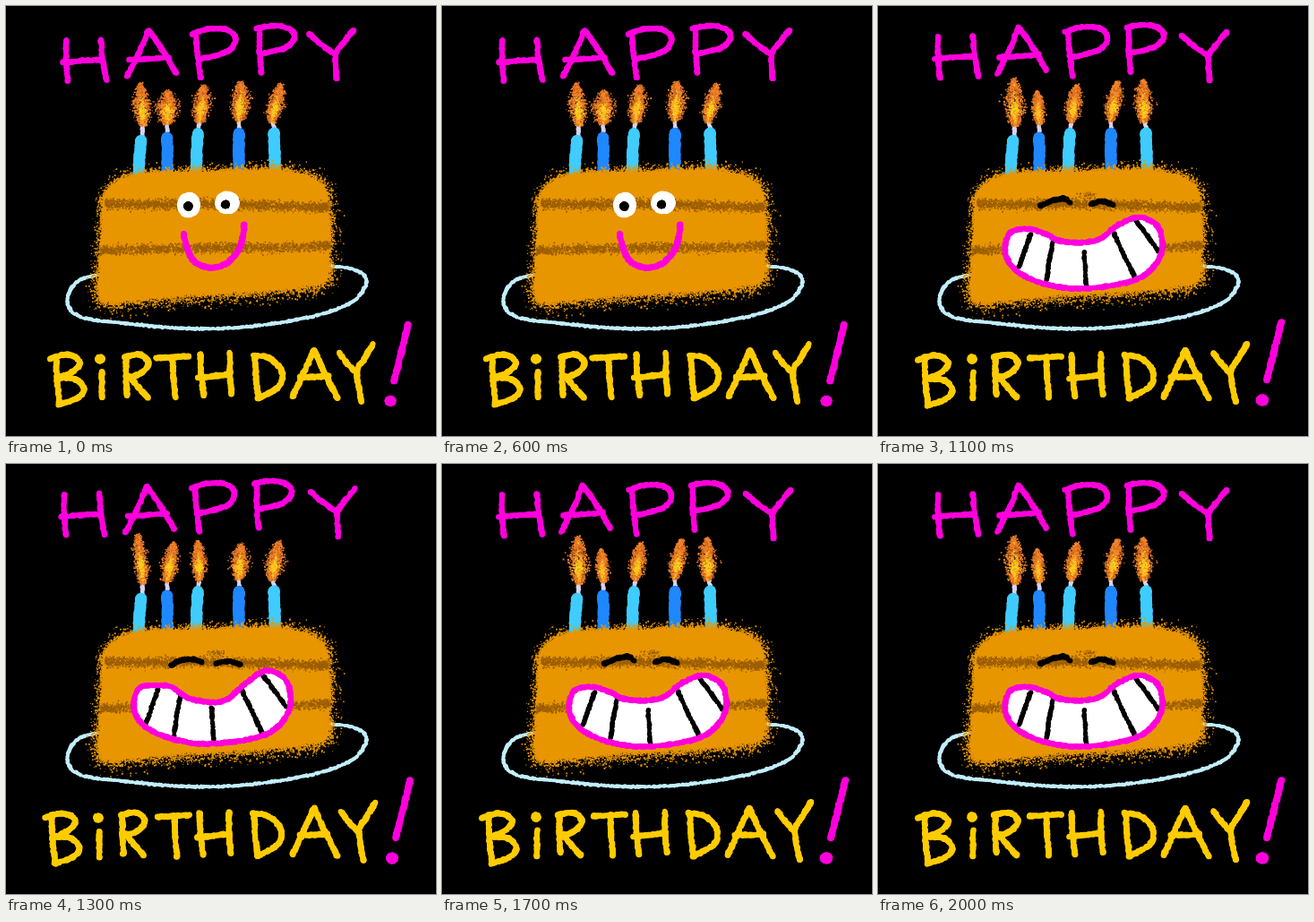
An HTML page with a canvas that plays this animation: 480x480 px, repeating every 2100 ms.

```html
<!DOCTYPE html>
<html lang="en">
<head>
<meta charset="utf-8">
<title>Happy Birthday</title>
<style>
html, body { margin: 0; width: 100%; height: 100%; overflow: hidden; background: #000; }
canvas { display: block; width: 480px; height: 480px; }
</style>
</head>
<body>
<canvas id="stage" width="480" height="480" role="img" aria-label="HAPPY BiRTHDAY!"></canvas>
<script>
const PINK = '#ff00dc', YELLOW = '#ffcc00', CAKE = '#e89600', BROWN = '#9c5e00';
const SKY = '#40ccff', BLUE = '#2088ff', WICK = '#d6d2f0', PLATE = '#c2eeff';
const STEP = 100, FRAMES = 21, LAUGH_START = 9;

// Each letter: strokes split by "|", then its shift in the second and third pose.
const happy = [
  ['67 38 67 60 69 84|106 37 108 60 112 83|63 63 85 61 107 60', -2, -4, 0, -4],
  ['159 27 149 51 135 79|159 27 174 48 190 75|138 60 160 59 182 57', -2, -2, -2, -3],
  ['212 31 214 55 217 80|208 31 225 26 245 26 256 35 251 48 235 55 216 59', -1, -4, 0, -2],
  ['283 26 283 50 285 75|280 25 300 22 317 26 322 36 311 47 287 53', -3, -3, -3, -1],
  ['338 31 352 43 368 54|388 27 375 43 368 55 369 81', 2, 0, 1, 2]
];
const birthday = [
  ['56 391 57 418 60 445|49 394 65 389 78 392 82 400 73 409 59 415|59 415 78 417 87 428 79 438 59 445', -5, 1, -4, 1],
  ['105 393 106 394|107 408 107 437', -3, 2, -1, 1],
  ['134 391 134 412 135 435|132 392 149 389 159 398 152 409 137 415|138 413 148 426 158 437', -4, 0, -3, 0],
  ['167 393 185 392 203 391|186 394 187 415 189 437', 2, 1, 2, 0],
  ['217 388 218 412 221 435|214 415 232 413 250 411|250 387 250 410 252 433', -1, 2, -1, 1],
  ['278 391 279 414 282 438|276 390 294 393 308 408 304 425 281 438', -1, 0, -1, 0],
  ['344 384 332 410 320 436|344 384 356 410 370 438|328 414 344 414 360 413', 0, 0, -1, 0],
  ['372 387 381 399 391 409|410 377 400 394 392 409 397 442', 2, 1, 2, 0]
];
const bang = ['449 355 441 388 433 419|429 440 429 442', 2, -2, 1, -2];

const candles = [
  [SKY, '151 150 149 168 148 188', '153 129 152 144'],
  [BLUE, '180 146 180 165 180 186', '180 127 180 140'],
  [SKY, '214 142 213 165 212 186', '216 125 215 136'],
  [BLUE, '260 142 260 165 260 186', '260 124 260 136'],
  [SKY, '299 142 300 165 300 184', '297 125 299 136']
];
// Tip x, tip y, half width per pose.
const flames = [
  [[150, 87, 10], [181, 95, 12], [221, 89, 10], [263, 85, 10], [306, 88, 9]],
  [[147, 79, 8], [187, 88, 9], [214, 87, 8], [262, 90, 10], [304, 87, 10]],
  [[152, 82, 11], [178, 96, 7], [222, 89, 9], [267, 85, 9], [296, 83, 10]]
];

const cakeEdge = '108 326 107 290 109 250 111 215 125 198 150 190 210 187 260 186 300 185 338 192 355 207 359 240 358 280 356 305 330 312 290 316 250 319 190 322 140 327';
const plate = '105 300 84 305 71 319 70 336 86 348 130 354 200 360 270 358 340 347 384 332 400 315 401 302 388 294 361 290';
const mouthTop = [
  '143 262 150 247 170 243 190 251 208 264 230 268 249 261 266 244 288 231 306 234',
  '143 264 150 249 168 247 185 249 203 261 230 266 248 262 266 246 289 231 307 236',
  '142 268 149 252 168 249 186 254 203 262 226 264 248 260 266 246 288 236 305 240'
];
const mouthBottom = '316 247 318 268 309 287 290 301 255 309 215 311 180 304 156 292 145 278';
const teeth = '169 251 163 268 156 288|194 259 190 280 187 303|229 271 230 288 231 307|262 250 274 275 285 298|287 236 300 253 312 270';
const lids = [
  '186 225 197 220 210 218 218 222|237 222 247 220 259 224',
  '184 225 195 219 210 218 218 221|235 223 247 220 262 224',
  '181 223 193 218 207 215 214 220|238 221 250 218 263 222'
];

let seed = 1, g;
function rnd() {
  seed = seed + 0x6D2B79F5 | 0;
  let t = Math.imul(seed ^ seed >>> 15, 1 | seed);
  t = t + Math.imul(t ^ t >>> 7, 61 | t) ^ t;
  return ((t ^ t >>> 14) >>> 0) / 4294967296;
}
const spread = s => (rnd() * 2 - 1) * s;
const gauss = s => (rnd() + rnd() + rnd() + rnd() - 2) * 1.73 * s;

function layer(paint) {
  const c = document.createElement('canvas');
  c.width = c.height = 480;
  g = c.getContext('2d');
  paint();
  return c;
}

// Smooth curve through the points, sampled about once per pixel.
function curve(text, closed) {
  const n = text.split(' ').map(Number), pts = [], out = [];
  for (let i = 0; i < n.length; i += 2) pts.push([n[i], n[i + 1]]);
  const len = pts.length;
  const at = i => closed ? pts[(i + len) % len] : pts[Math.max(0, Math.min(len - 1, i))];
  for (let i = 0; i < (closed ? len : len - 1); i++) {
    const [a, b, c, d] = [at(i - 1), at(i), at(i + 1), at(i + 2)];
    const steps = Math.ceil(Math.hypot(c[0] - b[0], c[1] - b[1]));
    for (let k = 0; k <= steps; k++) {
      const t = k / steps;
      out.push([0, 1].map(j => b[j] + t / 2 * (c[j] - a[j] +
        t * (2 * a[j] - 5 * b[j] + 4 * c[j] - d[j] + t * (3 * (b[j] - c[j]) + d[j] - a[j])))));
    }
  }
  return out;
}

function disc(x, y, r) {
  g.beginPath();
  g.arc(x, y, r, 0, 7);
  g.fill();
}

function chalk(text, color, width, dx = 0, dy = 0, closed = false) {
  g.fillStyle = color;
  for (const part of text.split('|'))
    for (const [x, y] of curve(part, closed))
      disc(x + dx + spread(.6), y + dy + spread(.6), width / 2 - .3 + spread(.5));
}

function fill(text, color) {
  g.fillStyle = color;
  g.beginPath();
  for (const p of curve(text, true)) g.lineTo(...p);
  g.fill();
}

function blob(x, y, rx, ry, color) {
  g.fillStyle = color;
  for (let a = 0; a < 6.3; a += .12)
    disc(x + Math.cos(a) * rx * .6 + spread(.5), y + Math.sin(a) * ry * .6 + spread(.5), Math.min(rx, ry) * .42);
  g.beginPath();
  g.ellipse(x, y, rx * .7, ry * .7, 0, 0, 7);
  g.fill();
}

function speck(x, y) {
  const s = .7 + rnd() * 1.2;
  g.fillRect(x - s / 2, y - s / 2, s, s);
}

function band(text, count) {
  const line = curve(text);
  g.fillStyle = BROWN;
  for (let i = 0; i < count; i++) {
    const [x, y] = line[rnd() * line.length | 0];
    speck(x + spread(2), y + gauss(2.8));
  }
}

function paintCake() {
  g.fillStyle = '#000';
  g.fillRect(0, 0, 480, 480);
  chalk(plate, PLATE, 4.4);
  for (const [color, body, wick] of candles) {
    chalk(wick, WICK, 5);
    chalk(body, color, 13);
  }
  fill(cakeEdge, CAKE);
  const edge = curve(cakeEdge, true);
  for (let i = 0; i < 15000; i++) {
    const [x, y] = edge[rnd() * edge.length | 0];
    const reach = y > 300 ? 5.2 : x > 335 ? 4.5 : 3.6;
    const d = -Math.log(1 - rnd() * .985) * reach, a = rnd() * 6.283;
    speck(x + Math.cos(a) * d, y + Math.sin(a) * d);
  }
  band('112 221 160 222 220 221 290 223 360 225', 2500);
  band('106 273 150 272 220 270 290 270 360 268', 2100);
}

function paintFlame([tipX, tipY, w], baseX, baseY) {
  for (let i = 0; i < 1150; i++) {
    const t = rnd() ** 1.15, side = gauss(.48);
    const half = w * Math.sin(Math.PI * (.1 + .85 * t)) ** .8;
    const hot = 1 - Math.abs(side) * 1.1 - Math.abs(t - .32) * 1.7;
    g.fillStyle = hot > .38 + spread(.3) ? (rnd() < .7 ? '#ffd020' : '#ffad20')
      : rnd() < .65 ? '#f5862c' : '#c9631c';
    speck(baseX + (tipX - baseX) * t + side * half, baseY + (tipY - baseY) * t + gauss(1));
  }
}

function paintWords(pose) {
  const write = (letters, color, width) => letters.forEach(([text, ...shift]) =>
    chalk(text, color, width, ...(pose ? shift.slice(pose * 2 - 2, pose * 2) : [0, 0])));
  write(happy, PINK, 6.4);
  write(birthday, YELLOW, 6.8);
  write([bang], PINK, 7.6);
  const [dx, dy] = [[429, 441], [431, 440], [429, 440]][pose];
  blob(dx, dy, 6.3 + pose * .3, 5.8 + pose * .3, PINK);
  const [ix, iy] = [[105, 394], [103, 395], [105, 394]][pose];
  blob(ix, iy, 5.5, 5.3, YELLOW);
}

function paintSmile(pose) {
  const dx = -pose * .5, dy = pose % 2;
  blob(204 + dx, 222 + dy, 12.5, 15, '#fff');
  blob(247 + dx, 219.5 + dy, 14, 12.5, '#fff');
  blob(203.5 + dx, 223.5 + dy, 5, 5, '#000');
  blob(245 + dx, 221.5 + dy, 4.7, 4.7, '#000');
  chalk('198 254 203 272 211 286 227 292 245 288 258 275 264 259 266 244', PINK, 7, dx, dy);
}

function paintLaugh(pose) {
  g.fillStyle = BROWN;
  for (let i = 0; i < 45; i++) speck(235 + gauss(5), 211 + gauss(1.5));
  chalk(lids[pose], '#000', 6.5);
  const drop = [0, 1, 4][pose];
  const lower = mouthBottom.split(' ').map((v, i) => i % 2 ? +v + drop : v - pose * .5).join(' ');
  const mouth = mouthTop[pose] + ' ' + lower;
  fill(mouth, pose ? '#fff' : '#f4fdff');
  chalk(teeth, '#000', 5.4, pose * .6, drop);
  chalk(mouth, PINK, 6.4, 0, 0, true);
}

const cake = layer(paintCake);
const scenes = [paintSmile, paintLaugh].map(face => [0, 1, 2].map(pose => layer(() => {
  seed = 50 + pose;
  g.drawImage(cake, 0, 0);
  flames[pose].forEach((f, i) => {
    const [x, y] = candles[i][2].split(' ').map(Number);
    paintFlame(f, x, y + 4);
  });
  paintWords(pose);
  face(pose);
})));

const stage = document.getElementById('stage').getContext('2d');
const start = performance.now();
function tick() {
  const frame = Math.floor((performance.now() - start) / STEP) % FRAMES;
  stage.drawImage(scenes[+(frame >= LAUGH_START)][frame % 3], 0, 0);
  requestAnimationFrame(tick);
}
tick();
</script>
</body>
</html>
```
